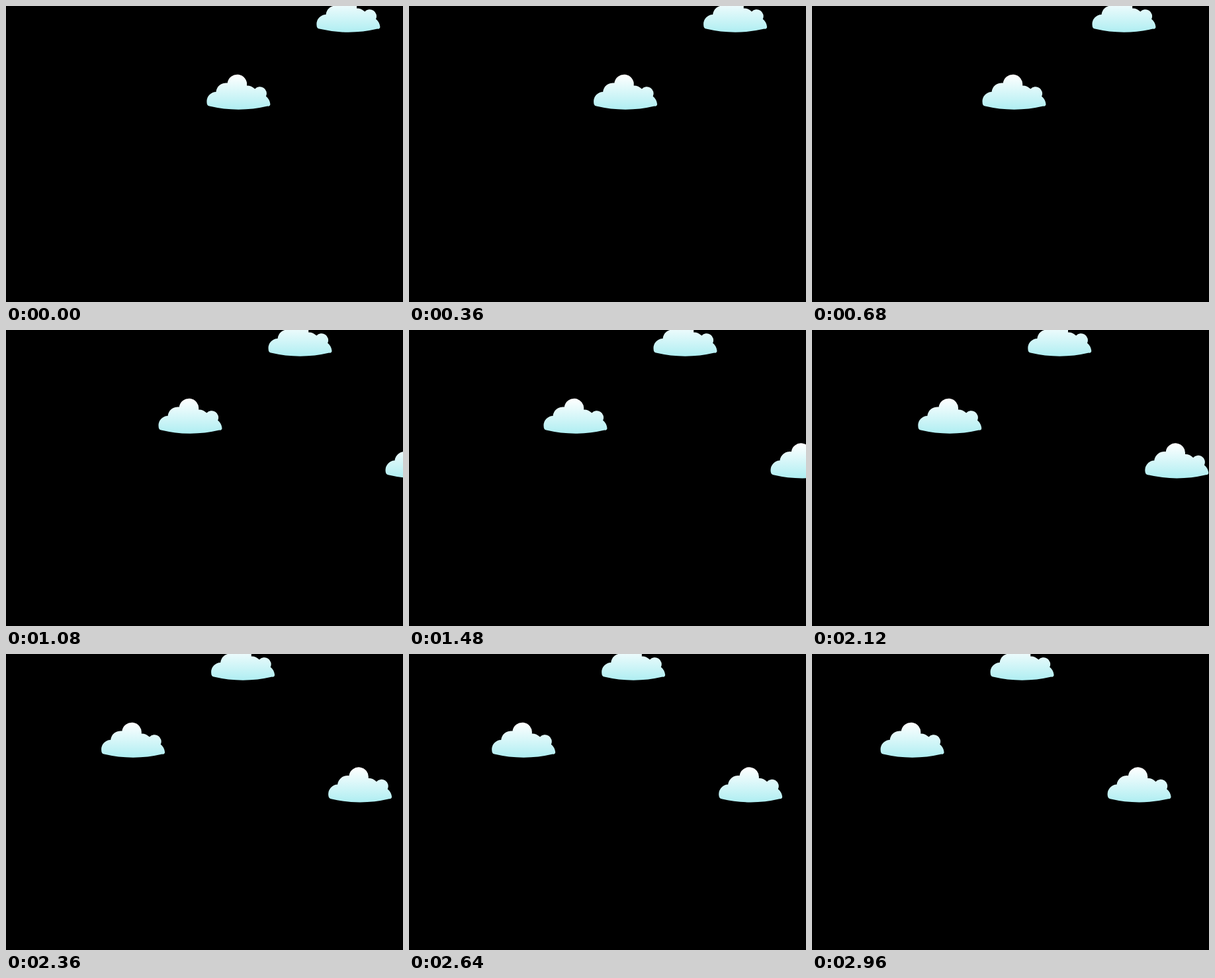
An HTML page for the animation above (3 s loop, 600 by 448 pixels).

```html
<!DOCTYPE html>
<html lang="en">
<head>
<meta charset="utf-8">
<title>Drifting clouds</title>
<style>
  html, body { margin: 0; width: 100%; height: 100%; overflow: hidden; background: #000; }
  svg { display: block; }
</style>
</head>
<body>
<svg width="600" height="448" viewBox="0 0 600 448">
  <defs>
    <linearGradient id="sky" x1="0" y1="0" x2="0" y2="1">
      <stop offset="0" stop-color="#fff"/>
      <stop offset="1" stop-color="#afeef2"/>
    </linearGradient>
    <path id="cloud" fill="url(#sky)" d="M0 41 A14.5 14.5 0 0 1 14 26
      A15 15 0 0 1 31.3 12.6 A14.7 14.7 0 0 1 60.6 16.4
      Q67.5 16.2 72.8 21.6 A10.2 10.2 0 0 1 89.6 32.8
      Q95 37 96 44.5 Q96 48 92 47.6 Q48 58 4 47.6 Q0 47 0 41Z"/>
  </defs>
  <g id="sheet">
    <use href="#cloud" x="0" y="104"/>
    <use href="#cloud" x="166" y="-13"/>
    <use href="#cloud" x="343" y="171.6"/>
  </g>
</svg>
<script>
  const LOOP = 3000, STEP = 40, SHIFT = 2.7, START = 303.4;
  const sheet = document.getElementById("sheet");

  function draw() {
    const step = Math.floor(performance.now() % LOOP / STEP);
    sheet.setAttribute("transform", `translate(${START - step * SHIFT} 0)`);
    requestAnimationFrame(draw);
  }
  draw();
</script>
</body>
</html>
```
